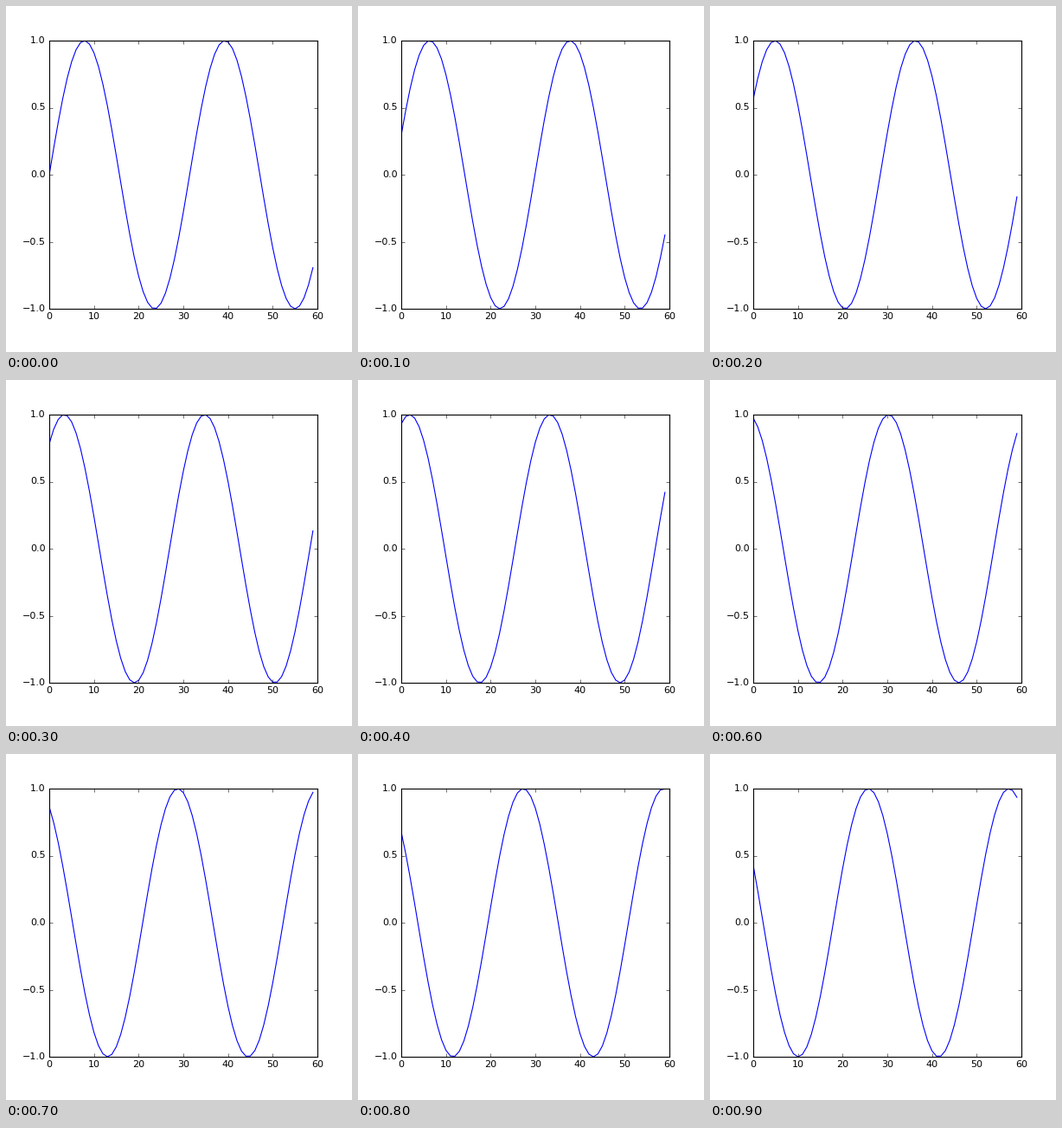
A matplotlib script for the animation above (1 s loop, 400 px wide and 400 px high).

```python
import matplotlib.pyplot as plt
import numpy as np
from matplotlib.animation import FuncAnimation

FRAMES = 10
INTERVAL_MS = 100
PHASE_STEP = 0.3

plt.style.use("classic")
plt.rcParams.update({
    "font.family": "DejaVu Sans",
    "font.size": 10,
    "figure.facecolor": "white",
    "savefig.facecolor": "white",
    "savefig.dpi": 80,
})

fig = plt.figure(figsize=(5, 5), dpi=80)
ax = fig.add_axes([0.125, 0.125, 0.775, 0.775])
ax.set(xlim=(0, 60), ylim=(-1, 1),
       xticks=np.arange(0, 61, 10), yticks=np.linspace(-1, 1, 5))

x = np.arange(60)
wave, = ax.plot(x, np.sin(0.2 * x), color="blue", lw=1)


def update(frame):
    wave.set_ydata(np.sin(0.2 * x + PHASE_STEP * frame))
    return wave,


anim = FuncAnimation(fig, update, frames=FRAMES, interval=INTERVAL_MS,
                     repeat=True, repeat_delay=0)
plt.show()
```
